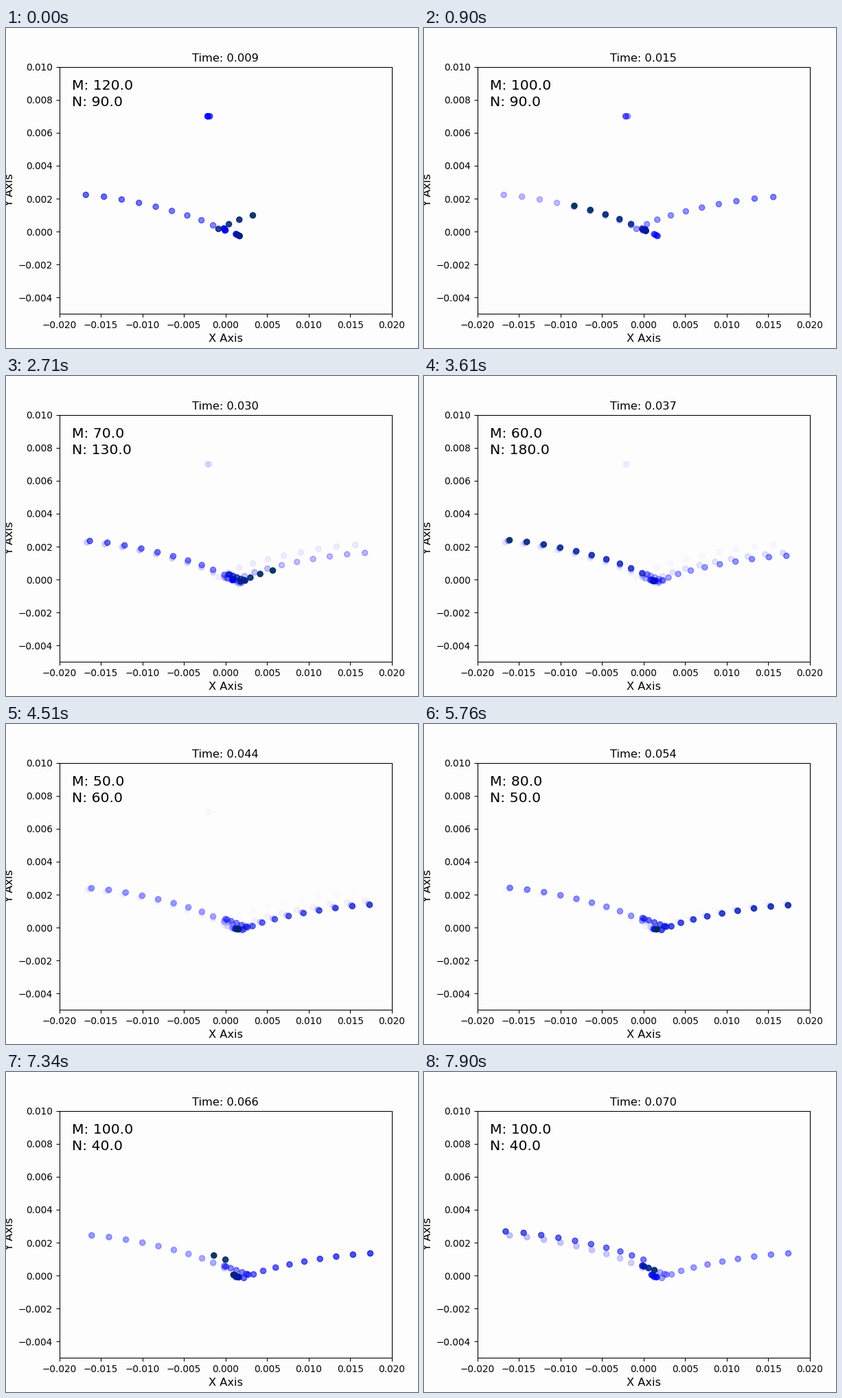
Write a matplotlib script that moves like this. It is 600 px wide and 467 px high and loops after 8 s.

```python
import numpy as np
import matplotlib.pyplot as plt
from matplotlib.animation import FuncAnimation

W, H, DPI = 600, 467, 100
STEPS, LOOP = 71, 8000
SCALE = 0.977          # size of type and lines against matplotlib defaults
CYCLES = 7
SWEEP = 2.1            # steps one outward sweep takes
BG = "#fefdfe"


def slow(cycle):
    return np.exp(-0.25 * cycle ** 2)


def fast(cycle):
    return np.exp(-cycle)


def drift(cycle, first, final, decay=slow, late=(0, 0)):
    """A point that relaxes from first to final; late shifts the last cycles."""
    first, final, late = map(np.array, (first, final, late))
    rise = np.exp(2 * (cycle - CYCLES + 1))
    return final + (first - final) * decay(cycle) + late * rise


def settle(p, q, t0, t1, n=7):
    """Dots that glide from p and come to rest at q."""
    u = np.linspace(0, 1, n)
    ease = u * u * (3 - 2 * u)
    return np.column_stack([t0 + (t1 - t0) * u, p + np.outer(ease, q - p)])


def sweep(a, b, t0, power):
    """Dots that speed up from a to b on a flattening arc."""
    u = np.arange(-1, 9) / 8
    along = np.sign(u) * np.abs(u) ** power
    up = 1 - (1 - u) ** 1.36
    xy = a + np.column_stack([along, up]) * (b - a)
    return np.column_stack([t0 + SWEEP * u, xy])


def left_stroke(c):
    return (-3.8 + 11.8 * c, 1.15,
            drift(c, (-0.2, 0.2), (1.6, -0.1)),
            drift(c, (0, 0.08), (1.25, -0.1), late=(-0.3, 0.15)),
            drift(c, (-1.5, 0.38), (-1.5, 0.72), late=(0.1, 0.5)),
            drift(c, (-16.8, 2.23), (-16.03, 2.41), late=(-0.55, 0.27)))


def right_stroke(c):
    return (1.4 + 12.05 * c, 1.2,
            drift(c, (1.25, -0.15), (-0.15, 0.6)),
            drift(c, (1.7, -0.27), (2.75, 0.06)),
            drift(c, (0.4, 0.45), (3.4, 0.07), fast),
            drift(c, (15.6, 2.1), (17.42, 1.34), fast))


def build_trail():
    parts = [np.array([(-7, x, 7.0) for x in (-2.15,) * 4 + (-1.9,) * 2])]
    last = -7.3
    for c in range(CYCLES):
        for stroke in (left_stroke, right_stroke):
            end, power, p, q, a, b = stroke(c)
            start = end - SWEEP
            parts.append(settle(p, q, last + 0.8, start - 0.4))
            parts.append(sweep(a, b, start, power))
            last = end
    trail = np.vstack(parts)
    return trail[np.argsort(trail[:, 0], kind="stable")]


TRAIL = build_trail()
BORN, DOTS = TRAIL[:, 0], TRAIL[:, 1:] / 1000


def dot_colors(age):
    fresh = np.exp(-age / 2.7)
    rgba = np.zeros((len(age), 4))
    rgba[:, 1] = 0.18 * fresh
    rgba[:, 2] = 1 - 0.68 * fresh
    rgba[:, 3] = 0.95 * np.exp(-age / 8.8)
    return rgba


COUNT_AT = [0, 15, 32, 40, 51, 59, 70]
COUNT_M = [120, 80, 60, 50, 80, 90, 100]
COUNT_N = [90, 80, 180, 60, 50, 40, 40]


def counter(step, values):
    return 10.0 * np.round(np.interp(step, COUNT_AT, values) / 10)


plt.rcParams.update({
    "font.family": "DejaVu Sans",
    "axes.linewidth": 0.8 * SCALE,
    "axes.labelsize": 12 * SCALE,
    "axes.labelpad": 3.5 * SCALE,
    "axes.titlesize": 12 * SCALE,
    "axes.titlepad": 6 * SCALE,
})
for side in ("xtick", "ytick"):
    plt.rcParams.update({
        f"{side}.labelsize": 10 * SCALE,
        f"{side}.major.size": 3.5 * SCALE,
        f"{side}.major.width": 0.8 * SCALE,
        f"{side}.major.pad": 3.5 * SCALE,
    })

fig = plt.figure(figsize=(W / DPI, H / DPI), dpi=DPI, facecolor=BG)
ax = fig.add_axes([77.5 / W, 1 - 417.3 / H, 484.5 / W, 360.6 / H],
                  facecolor=BG)
ax.set_xlim(-0.02, 0.02)
ax.set_ylim(-0.005, 0.01)
ax.set_xticks(np.arange(-4, 5) * 0.005)
ax.set_yticks(np.arange(-2, 6) * 0.002)
ax.xaxis.set_major_formatter("{x:.3f}")
ax.yaxis.set_major_formatter("{x:.3f}")
ax.set_xlabel("X Axis")
ax.set_ylabel("Y Axis")
title = ax.set_title("")
text_m, text_n = (fig.text(95.5 / W, 1 - y / H, "", fontsize=15 * SCALE)
                  for y in (90.5, 114))
dots = ax.scatter([], [], s=(6 * SCALE) ** 2, linewidths=SCALE, zorder=2)


def update(step):
    seen = BORN <= step
    colors = dot_colors(step - BORN[seen])
    dots.set_offsets(DOTS[seen])
    dots.set_facecolor(colors)
    dots.set_edgecolor(colors)
    title.set_text(f"Time: {0.009 + 0.000875 * step:.3f}")
    text_m.set_text(f"M: {counter(step, COUNT_M):.1f}")
    text_n.set_text(f"N: {counter(step, COUNT_N):.1f}")
    return dots, title, text_m, text_n


anim = FuncAnimation(fig, update, frames=STEPS, interval=LOOP / STEPS,
                     repeat=True, repeat_delay=0, blit=False)
plt.show()
```
